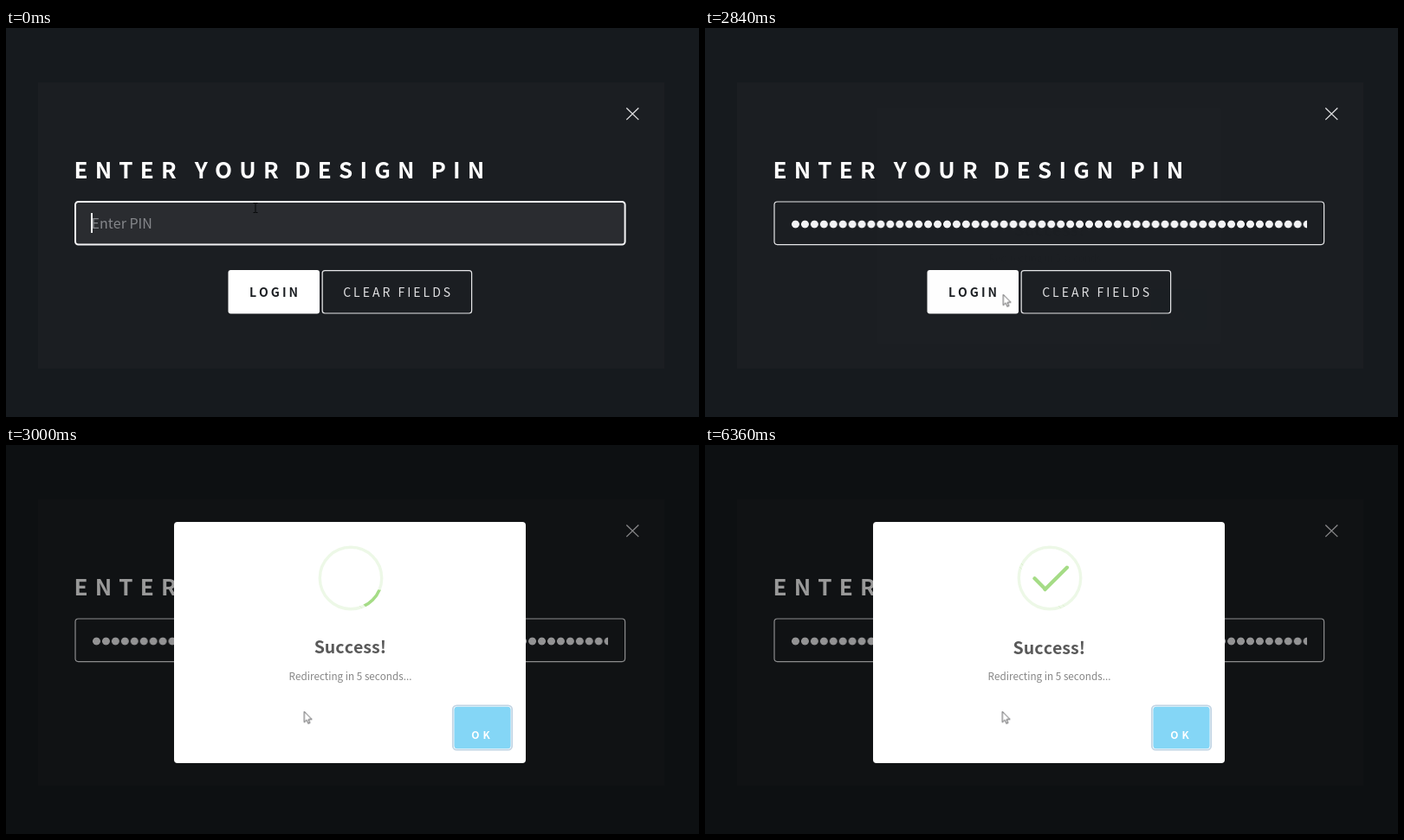
Animation, 800 px wide and 450 px high, one loop 6.76 s. Source, as an HTML page:

```html
<!DOCTYPE html>
<html lang="en">
<head>
<meta charset="utf-8">
<title>PIN login</title>
<style>
html, body { margin: 0; width: 100%; height: 100%; overflow: hidden; background: #161a1e; }
#stage { position: relative; width: 800px; height: 450px; overflow: hidden; }
#stage > *, #modal svg { position: absolute; }
svg { display: block; overflow: visible; }
text { font-family: "Source Sans Pro", "Noto Sans CJK JP", "Noto Sans CJK SC", "Noto Sans CJK", "Open Sans", sans-serif; font-kerning: none; }
.bold { font-weight: 600; }
.title { font-size: 26px; letter-spacing: 8.2px; fill: #fff; }
.button { font-size: 14px; letter-spacing: 3px; }

/* every animation shares one 6760 ms cycle */
#field, #hint, #dots, #caret, .cursor { animation: 6.76s step-end infinite; }
#shade, #modal, #pointer { animation: 6.76s linear infinite; }

#field { animation-name: field; }
@keyframes field {
  0% { fill: #2a2c30; stroke: #f4f4f6; stroke-width: 2px; }
  40.237%, 100% { fill: transparent; stroke: #e8e8ea; stroke-width: 1.2px; }
}
#hint { font-size: 16px; font-weight: 300; fill: #85878b; animation-name: hint; }
@keyframes hint { 0% { opacity: 1; } 6.509%, 100% { opacity: 0; } }

#dots {
  --n: 0;
  left: 98.6px; top: 213px; height: 25px; width: calc(var(--n) * 10.95px);
  background: radial-gradient(circle at 50% 14px, #f4f4f6 4px, transparent 4.8px) 0 0 / 10.95px 25px repeat-x;
  animation-name: type;
}
@keyframes type {
  0% { width: 0; }
  6.509% { width: 10.95px; }
  8.876% { width: 21.9px; }
  11.243% { width: 32.85px; }
  13.018% { width: 43.8px; }
  15.385% { width: 54.75px; }
  19.527% { width: 65.7px; }
  22.485% { width: 76.65px; }
  25.444% { width: 87.6px; }
  40.237%, 100% { width: 596.6px; }
}
#caret { position: absolute; left: 100%; top: 1px; width: 1.3px; height: 23px; margin-left: -.3px; background: #f0f0f2; animation-name: caret; }
@keyframes caret {
  0% { opacity: 1; }
  1.775% { opacity: 0; }
  6.509% { opacity: 1; }
  29.586% { opacity: 0; }
  35.503% { opacity: 1; }
  40.237%, 100% { opacity: 0; }
}

#shade { inset: 0; background: #000; opacity: 0; animation-name: shade; }
@keyframes shade {
  0%, 42.012% { opacity: 0; }
  42.604% { opacity: .12; }
  43.195% { opacity: .33; }
  44.379%, 100% { opacity: .4; }
}
#modal { left: 194px; top: 89px; width: 406px; height: 279px; border-radius: 4px; background: #fff; opacity: 0; animation-name: modal; }
@keyframes modal {
  0%, 42.012% { opacity: 0; transform: scale(.98); }
  42.604% { opacity: .33; }
  43.195% { opacity: .88; transform: scale(.98); }
  43.787%, 100% { opacity: 1; transform: none; }
}

#icon { position: absolute; left: 159.5px; top: 20.5px; width: 80px; height: 80px; border: 4px solid #a5dc86; border-radius: 50%; transform: scale(.85); }
#icon::before, #icon::after, #icon i { content: ""; position: absolute; }
#icon::before, #icon::after { width: 60px; height: 120px; background: #fff; transform: rotate(-45deg); }
#icon::before { left: -33px; top: -7px; border-radius: 120px 0 0 120px; transform-origin: 60px 60px; }
#icon::after { left: 30px; top: -11px; border-radius: 0 120px 120px 0; transform-origin: 0 60px; animation: sweep 6.76s ease-in infinite; }
@keyframes sweep {
  0%, 43.232% { transform: rotate(-45deg); }
  47.633%, 100% { transform: rotate(-405deg); }
}
#icon .ring { z-index: 2; left: -4px; top: -4px; width: 80px; height: 80px; border: 4px solid rgba(165, 220, 134, .2); border-radius: 50%; }
#icon .gap { z-index: 1; left: 28px; top: 8px; width: 5px; height: 90px; background: #fff; transform: rotate(-45deg); }
#icon .tip, #icon .long { z-index: 2; height: 5px; border-radius: 2px; background: #a5dc86; animation: 6.76s ease infinite; }
#icon .tip { transform: rotate(45deg); animation-name: tip; }
#icon .long { transform: rotate(-45deg); animation-name: long; }
@keyframes tip {
  0%, 46.08% { width: 0; left: 1px; top: 19px; }
  47.855% { width: 50px; left: -8px; top: 37px; }
  49.408% { width: 17px; left: 21px; top: 48px; }
  51.183%, 100% { width: 25px; left: 14px; top: 45px; }
}
@keyframes long {
  0%, 47.3% { width: 0; right: 46px; top: 54px; }
  49.408% { width: 55px; right: 0; top: 35px; }
  51.183%, 100% { width: 47px; right: 8px; top: 38px; }
}

#pointer { left: 0; top: 0; width: 1px; height: 1px; animation-name: move; }
@keyframes move {
  0%, 25.444% { transform: translate(288px, 208px); animation-timing-function: ease-in-out; }
  31.361%, 85.207% { transform: translate(344.3px, 308.3px); }
  85.22%, 100% { transform: translate(343.3px, 308.3px); }
}
#beam { animation-name: beam; }
#arrow { animation-name: arrow; }
#hand { animation-name: hand; }
@keyframes beam { 0% { opacity: 1; } 28.2%, 100% { opacity: 0; } }
@keyframes arrow { 0% { opacity: 0; } 28.2% { opacity: 1; } 29.2% { opacity: 0; } 42.012%, 100% { opacity: 1; } }
@keyframes hand { 0% { opacity: 0; } 29.2% { opacity: 1; } 42.012%, 100% { opacity: 0; } }
</style>
</head>
<body>
<div id="stage">
  <svg width="800" height="450">
    <rect x="37" y="63" width="723" height="331" fill="#1b1e22"/>
    <path d="M716.3 92.5l14 13.6m0-13.6l-14 13.6" stroke="#e2e2e4" stroke-width="1.3"/>
    <g class="title bold">
      <text x="78.5" y="173.5">ENTER</text>
      <text x="217.8" y="173.5">YOUR</text>
      <text x="333" y="173.5">DESIGN</text>
      <text x="490.5" y="173.5">PIN</text>
    </g>
    <rect id="field" x="80" y="201" width="634.6" height="49.6" rx="3.5"/>
    <text id="hint" x="98.6" y="232">Enter PIN</text>
    <rect x="256.5" y="280" width="105.5" height="50.5" rx="3" fill="#fff"/>
    <text class="button bold" x="281" y="311.3" fill="#1b1e22">LOGIN</text>
    <rect x="365.2" y="280.6" width="172.4" height="49.4" rx="3" fill="none" stroke="#e8e8ea" stroke-width="1.2"/>
    <text class="button" x="389.2" y="311.3" fill="#e2e2e4">CLEAR FIELDS</text>
  </svg>
  <div id="dots"><div id="caret"></div></div>
  <div id="shade"></div>
  <div id="modal">
    <div id="icon"><i class="gap"></i><i class="ring"></i><i class="tip"></i><i class="long"></i></div>
    <svg width="406" height="279" viewBox="194 89 406 279">
      <text class="bold" x="397.3" y="241.5" font-size="19.6" text-anchor="middle" fill="#595959">Success!</text>
      <text x="397.5" y="271.7" font-size="11.7" font-weight="300" text-anchor="middle" fill="#858585">Redirecting in 5 seconds...</text>
      <rect x="515.8" y="301.3" width="68.4" height="51.4" rx="4.5" fill="#fff" stroke="#c2d5e4" stroke-width="1.8"/>
      <rect x="517.4" y="302.8" width="65.2" height="48.4" rx="3.5" fill="#84d6f6"/>
      <text class="bold" x="537.3" y="340" font-size="12" letter-spacing="4" fill="#fff">OK</text>
    </svg>
  </div>
  <svg id="pointer">
    <path id="beam" class="cursor" d="M-2.5-5.5h2l.5.5.5-.5h2M0-5V5M-2.5 5.5h2l.5-.5.5.5h2" fill="none" stroke="#050607"/>
    <path id="arrow" class="cursor" d="M0 0V12.5L2.9 9.8 4.7 14 6.6 13.2 4.9 9.1H8.8Z" fill="#fff" stroke="#4a4a4c" stroke-width=".9"/>
    <path id="hand" class="cursor" d="M-1.4 10.2V1.6Q-1.4.2 0 .2T1.4 1.6V6.2Q3.6 5.2 4.2 6.8 6 6 6.6 7.6 8.6 7 8.6 9V12.4Q8.6 14.5 7.4 15.4V17.4H.2V16Q-2.2 13.6-3.8 10.6-4.2 8.6-2.8 8.8Z" fill="#fff" stroke="#4a4a4c" stroke-width=".9" stroke-linejoin="round"/>
  </svg>
</div>
</body>
</html>
```
